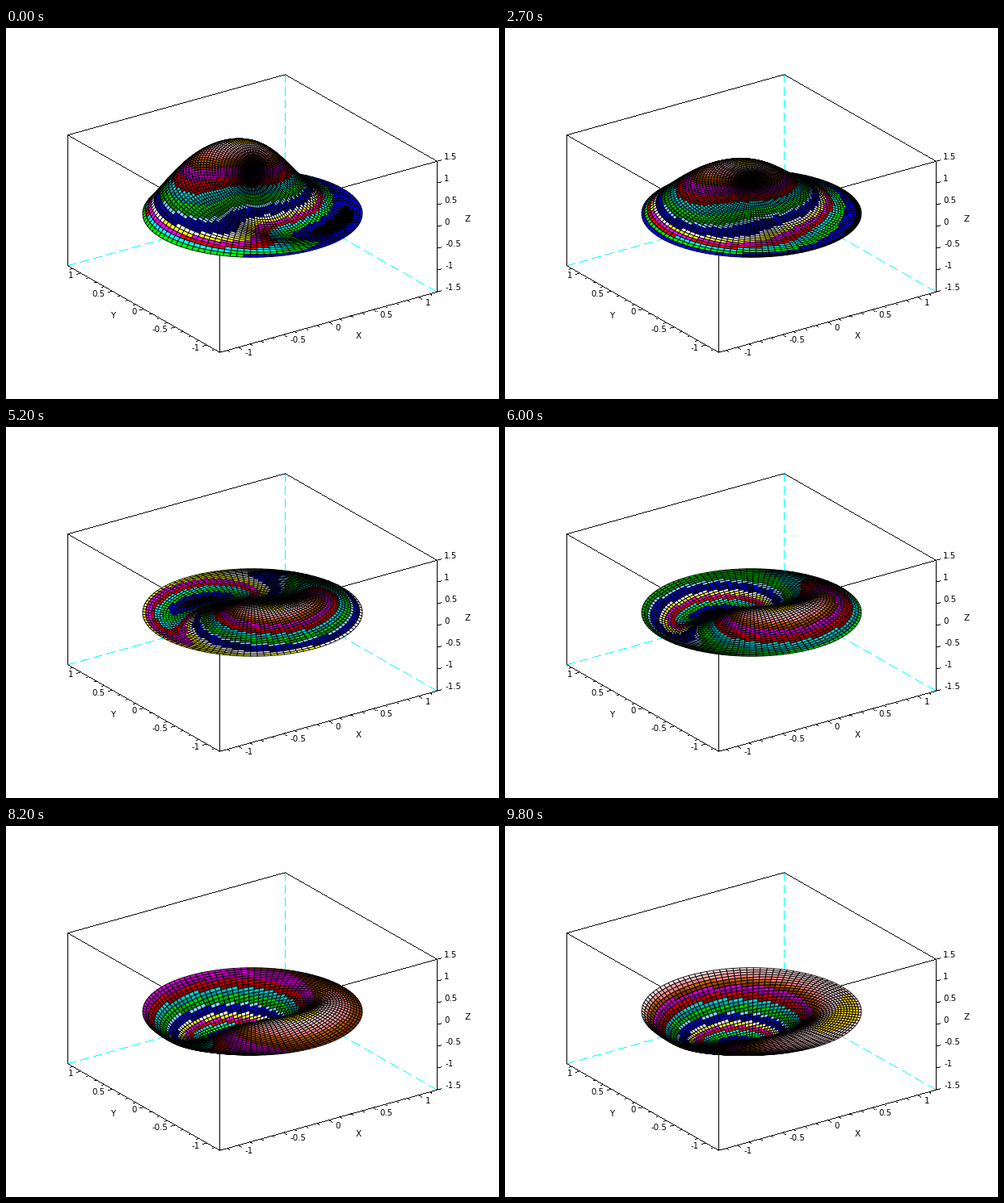
A matplotlib script that plays this animation: 610 by 460 pixels, repeating every 9900 ms.

```python
import numpy as np
import matplotlib.pyplot as plt
from matplotlib.animation import FuncAnimation
from matplotlib.collections import PolyCollection

W, H, DPI = 610, 460, 80
PX = 72 / DPI
FRAMES, INTERVAL = 99, 100

# Oblique projection of world axes to pixels, y down
CENTER = np.array([304.5, 229.5])
SPAN = 1.207
EX = np.array([134.5, -37.5]) / SPAN
EY = np.array([-94.0, -53.75]) / SPAN
EZ = np.array([0.0, -54.0])

# Drum modes: radial and once-around, the second one twisted with radius
K0, K1 = 2.4048, 3.8317
SPEED = 0.0104
NR, NT = 38, 100


def make_palette():
    bits = [((i >> 2) & 1, (i >> 1) & 1, i & 1) for i in range(8)]
    colors = [np.multiply(b, 255) for b in bits]
    for i in range(1, 6):
        colors += [np.multiply(bits[i], v) for v in (144, 176, 208)]
        if i == 1:
            colors.append((135, 206, 255))
    colors += [(128 + 32 * k, 48 + 24 * k, 0) for k in range(3)]
    colors += [(255, 128 + 32 * k, 128 + 32 * k) for k in range(4)]
    colors.append((255, 215, 0))
    return np.array(colors) / 255


def project(x, y, z):
    x, y, z = (np.asarray(v, float)[..., None] for v in (x, y, z))
    return CENTER + x * EX + y * EY + z * EZ


def bessel(n, x):
    tau = (np.arange(200) + 0.5) * np.pi / 200
    return np.cos(n * tau - np.asarray(x)[..., None] * np.sin(tau)).mean(-1)


def corners(grid):
    return np.stack([grid[:-1, :-1], grid[1:, :-1],
                     grid[1:, 1:], grid[:-1, 1:]], axis=2)


PALETTE = make_palette()
radius = np.linspace(0, 1, NR + 1)
R, A = np.meshgrid(radius, np.linspace(0, 2 * np.pi, NT + 1), indexing="ij")
X, Y = R * np.cos(A), R * np.sin(A)
MODE0 = bessel(0, K0 * R)
MODE1 = bessel(1, K1 * R) * np.cos(A - 0.6 - 2.1 * R)

fig = plt.figure(figsize=(W / DPI, H / DPI), dpi=DPI, facecolor="white")
ax = fig.add_axes([0, 0, 1, 1])
ax.set_xlim(0, W)
ax.set_ylim(H, 0)
ax.axis("off")


def line(p, q, color="black", on=1, off=0):
    """Draw a crisp one-pixel line as a row of unit squares."""
    n = int(round(np.abs(np.subtract(q, p)).max()))
    i = np.arange(n + 1)
    dots = np.round(p + np.outer(i / n, np.subtract(q, p)))
    dots = dots[i % (on + off) < on]
    square = np.array([(0, 0), (1, 0), (1, 1), (0, 1)])
    ax.add_collection(PolyCollection(dots[:, None] + square, facecolors=color,
                                     linewidths=0, zorder=1), autolim=False)


def label(x, y, text, ha="center"):
    ax.text(x, y, text, ha=ha, va="center", fontsize=10.3 * PX,
            family="DejaVu Sans", color="black", zorder=3)


def corner(sx, sy, sz):
    return project(sx * SPAN, sy * SPAN, sz * 1.5)


def draw_box():
    back = corner(1, 1, -1)
    for start in [(1, 1, 1), (-1, 1, -1), (1, -1, -1)]:
        line(corner(*start), back, "cyan", 11, 5)
    ring = [(-1, 1), (1, 1), (1, -1), (-1, -1)]
    for a, b in zip(ring, ring[1:] + ring[:1]):
        line(corner(*a, 1), corner(*b, 1))
    for a in [(-1, 1), (1, -1), (-1, -1)]:
        line(corner(*a, -1), corner(*a, 1))
    line(corner(-1, 1, -1), corner(-1, -1, -1))
    line(corner(-1, -1, -1), corner(1, -1, -1))


def draw_ticks():
    out_x = -EY / np.hypot(*EY)
    out_y = -EX / np.hypot(*EX)
    for i in range(-9, 10):
        v = i / 8
        size = 5 if i % 4 == 0 else 3
        px = project(v, -SPAN, -1.5)
        py = project(-SPAN, v, -1.5)
        line(px, px + size * out_x)
        line(py, py + size * out_y)
        if i % 4 == 0:
            label(px[0] + 8.5, px[1] + 7.5, f"{v:g}", "left")
            label(py[0] - 8.5, py[1] + 4, f"{v:g}", "right")
    for v in np.arange(-1.5, 1.6, 0.5):
        p = project(SPAN, -SPAN, v)
        line(p, p - 5 * out_y)
        label(542 + (v < 0) * 1.5, p[1] - 5, f"{v:g}", "left")
    label(436, 382, "X")
    label(132.5, 357, "Y")
    label(571, 237.5, "Z")


draw_box()
draw_ticks()
surface = PolyCollection([], edgecolors="black", linewidths=0.85 * PX,
                         zorder=2)
ax.add_collection(surface, autolim=False)


def update(i):
    t = SPEED * i
    z = np.cos(K0 * t) * MODE0 + np.cos(K1 * t) * MODE1
    quads = corners(project(X, Y, z)).reshape(-1, 4, 2) + 0.5
    mean = corners(z).mean(axis=2).ravel()
    level = (mean - z.min()) / (z.max() - z.min())
    index = np.floor(31 * level + 0.5).astype(int)
    # Paint far facets first
    away = 0.57 * X + 0.82 * Y
    depth = corners(124.7 * away - 23.5 * z).mean(axis=2).ravel()
    order = np.argsort(-depth)
    surface.set_verts(quads[order])
    surface.set_facecolor(PALETTE[index[order]])
    return surface,


anim = FuncAnimation(fig, update, frames=FRAMES, interval=INTERVAL,
                     init_func=lambda: update(0), repeat=True, repeat_delay=0)
plt.show()
```
